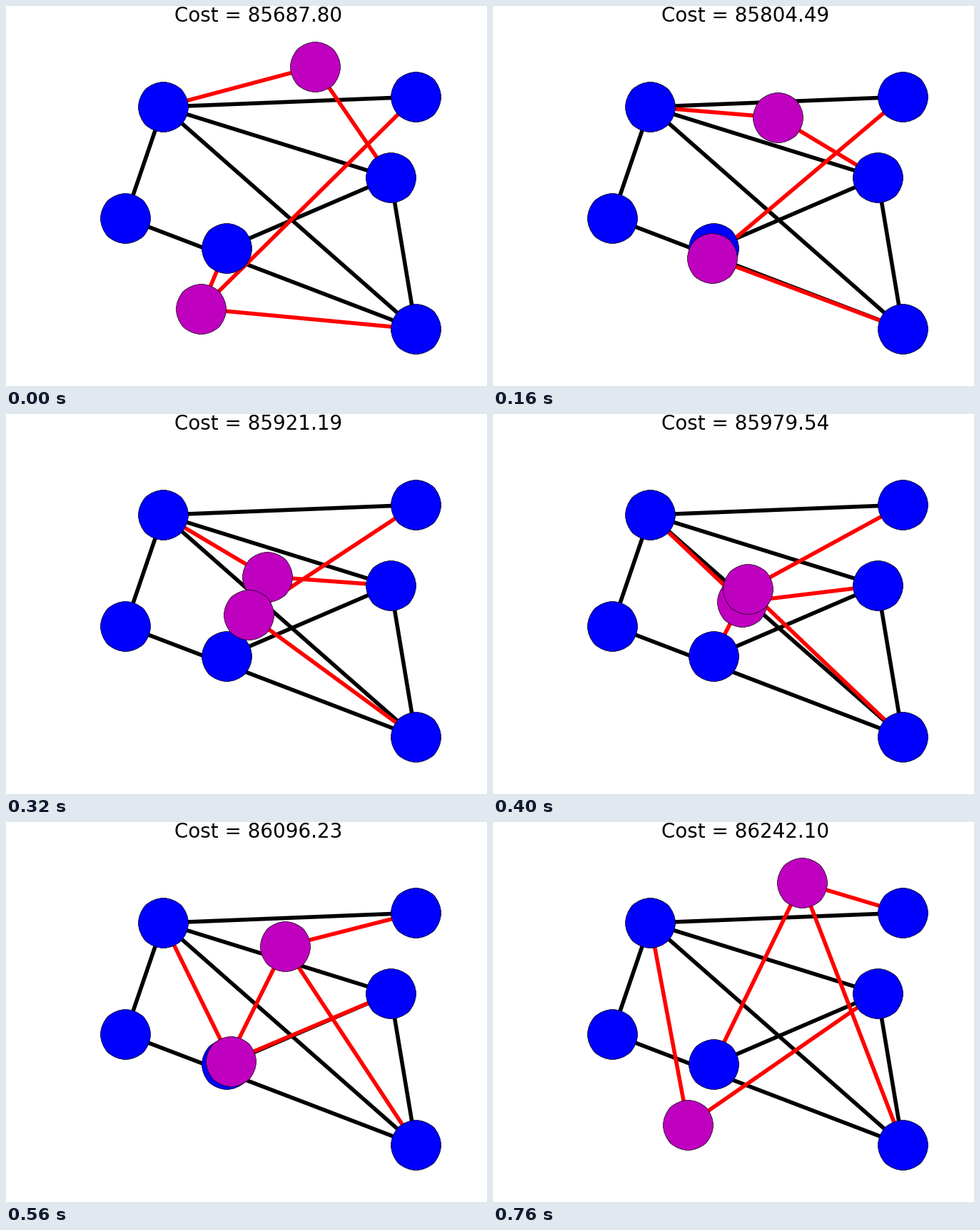
Animation, 674 px wide and 532 px high, one loop 800 ms. Source, as a matplotlib script:

```python
import numpy as np
import matplotlib.pyplot as plt
from matplotlib.animation import FuncAnimation
from matplotlib.collections import LineCollection

W, H, DPI = 674, 532, 100
FRAMES, INTERVAL = 20, 40
COST_START, COST_END = 85687.80, 86242.10


def to_pixels(col, row):
    """Stage position of a grid cell."""
    return 167.15 + 17.7 * col, 84.8 + 14.13 * row


# Fixed nodes and the edges between them
nodes = np.array([to_pixels(*cell) for cell in
                  [(3, 4), (23, 3), (21, 11), (0, 15), (8, 18), (23, 26)]])
fixed_edges = [(0, 1), (0, 2), (0, 5), (0, 3), (3, 5), (4, 2), (2, 5)]

# Two nodes that trade places, with the fixed nodes each one is tied to
swap_start = np.array([to_pixels(15, 0), to_pixels(6, 24)])
swap_links = [(0, 0), (0, 2), (1, 4), (1, 1), (1, 5)]

fig = plt.figure(figsize=(W / DPI, H / DPI), dpi=DPI, facecolor="white")
ax = fig.add_axes([0, 0, 1, 1])
ax.set_xlim(0, W)
ax.set_ylim(H, 0)
ax.axis("off")


def add_edges(segments, color, zorder):
    lines = LineCollection(segments, colors=color, linewidths=4, zorder=zorder)
    return ax.add_collection(lines, autolim=False)


def add_nodes(points, color, zorder):
    # Snapping gives the discs their slightly faceted outline
    return ax.scatter(points[:, 0], points[:, 1], s=50 ** 2, c=color,
                      edgecolors="black", linewidths=0.5, zorder=zorder,
                      snap=True)


def link_segments(movers):
    return [(movers[m], nodes[n]) for m, n in swap_links]


add_edges([(nodes[a], nodes[b]) for a, b in fixed_edges], "black", 1)
links = add_edges(link_segments(swap_start), "#ff0000", 2)
add_nodes(nodes, "#0000ff", 3)
swappers = add_nodes(swap_start, "#bf00bf", 4)
title = ax.text(353.6, 22, "", fontsize=20, family="DejaVu Sans",
                color="black", ha="center", va="baseline")


def update(frame):
    t = frame / (FRAMES - 1)
    movers = swap_start + t * (swap_start[::-1] - swap_start)
    swappers.set_offsets(movers)
    links.set_segments(link_segments(movers))
    cost = COST_START + t * (COST_END - COST_START)
    title.set_text(f"Cost = {cost:.2f}")
    return links, swappers, title


anim = FuncAnimation(fig, update, frames=FRAMES, interval=INTERVAL,
                     repeat=True, repeat_delay=0)
plt.show()
```
